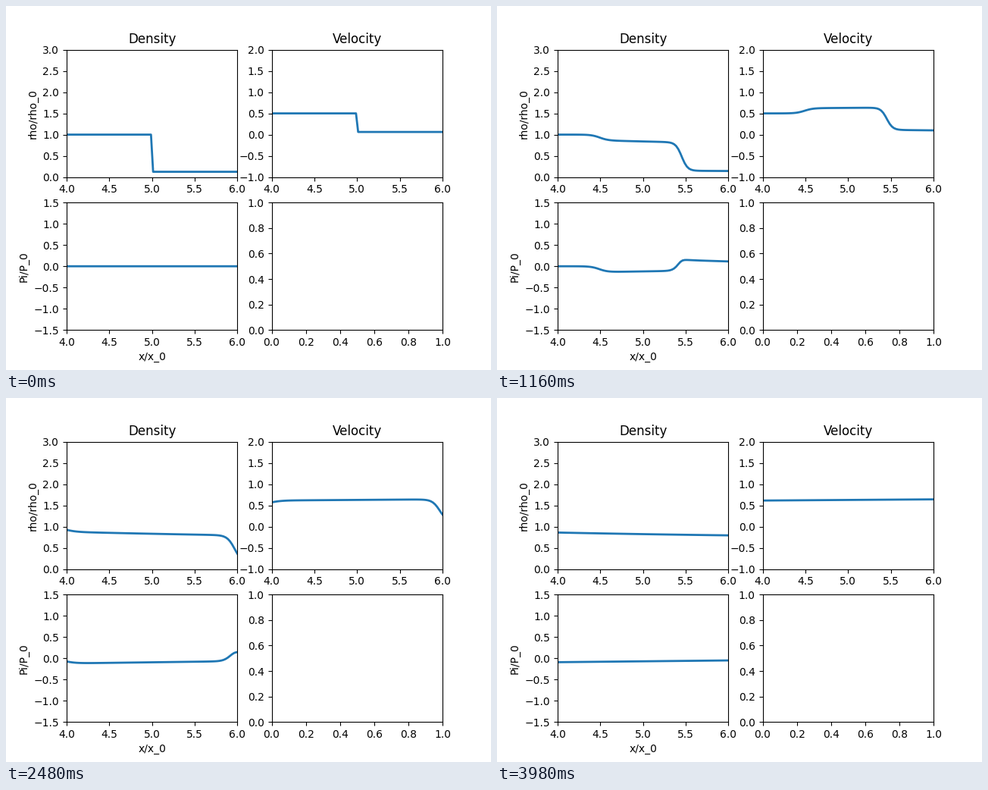
Write a matplotlib script that moves like this. It is 640x480 px and loops after 4 s.

```python
import numpy as np
import matplotlib.pyplot as plt
from matplotlib.animation import FuncAnimation

FRAMES = 200
DX = 0.025
x = np.arange(4 - 1.5 * DX, 6 + 2 * DX, DX)


def step(center, width):
    """Smooth rise from 0 to 1 around center."""
    return 0.5 * (1 + np.tanh((x - center) / max(width, 1e-3)))


def mix(a, b, s):
    return a + (b - a) * s


def profiles(n):
    """Density, momentum and viscous stress after n time steps."""
    contact = 5 + 0.0078 * n
    rare = step(5 - 0.0092 * n + 7e-6 * n**2, 0.018 * n**0.42)
    jump = step(contact, 0.0205 * n**0.3)
    front = 1 - step(5 + 0.022 * n, 0.023 * n**0.33)
    d = x - 5

    # plateau between the left-going wave and the contact
    rho_mid = 0.846 - 0.000115 * n + (0.00011 * n - 0.055) * d + 0.004 * d**2
    mom_mid = 0.63 - 1e-5 * n + 0.014 * d
    pi_mid = -0.15 * np.exp(-n / 270) + 0.04 * np.exp(-n / 300) * d

    # state between the contact and the right-going wave
    ahead = np.maximum(x - contact, 0)
    pi_right = (0.147 - 0.06 * ahead + 0.013 * np.exp(-ahead / 0.1)) * front
    rho_right = 0.125 + 0.16 * pi_right
    mom_right = 0.0625 + 0.33 * pi_right

    rho_left = mix(1, rho_mid, rare)
    rho = mix(rho_left, rho_right, jump)
    mom = mix(mix(0.5, mom_mid, rare), mom_right, jump)
    # stress balances a stiff pressure across the contact
    pi = mix(pi_right, pi_mid * rare, (rho / rho_left) ** 4)
    return rho, mom, pi


fig, axes = plt.subplots(2, 2, figsize=(6.4, 4.8), dpi=100)
panels = [axes[0, 0], axes[0, 1], axes[1, 0]]
for ax, ylim in zip(panels, [(0, 3), (-1, 2), (-1.5, 1.5)]):
    ax.set(xlim=(4, 6), ylim=ylim)
    ax.set_xticks(np.arange(4, 6.1, 0.5))
    ax.set_yticks(np.arange(ylim[0], ylim[1] + 0.1, 0.5))
axes[0, 0].set(title="Density", ylabel="rho/rho_0")
axes[0, 1].set(title="Velocity")
axes[1, 0].set(xlabel="x/x_0", ylabel="Pi/P_0")
lines = [ax.plot([], [], lw=2, color="tab:blue")[0] for ax in panels]


def update(n):
    for line, y in zip(lines, profiles(n)):
        line.set_data(x, y)
    return lines


anim = FuncAnimation(fig, update, frames=FRAMES, interval=20,
                     repeat=True, repeat_delay=0, blit=True)
plt.show()
```
